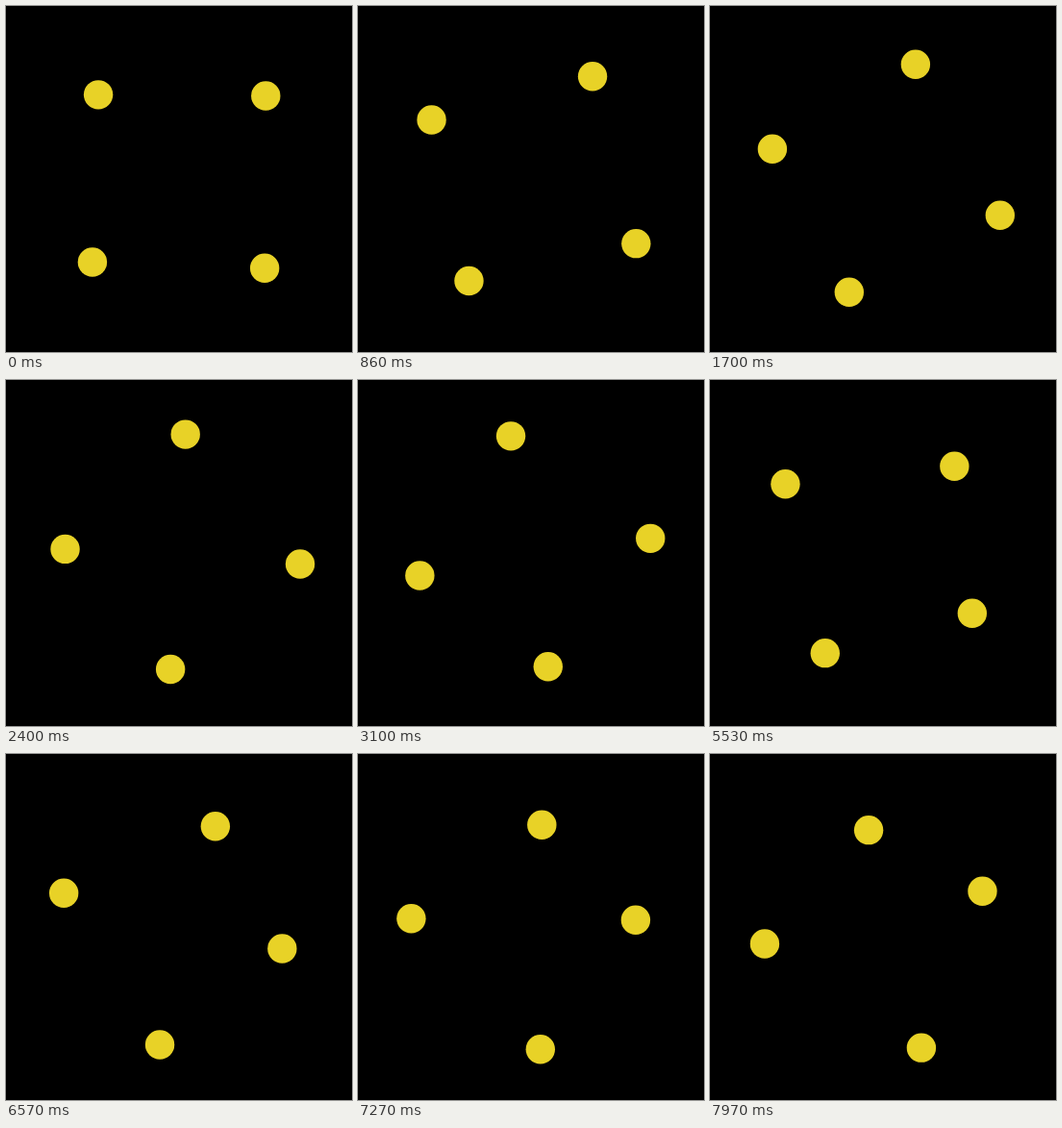
These frames come from a looping animation (360x360 px, 8000 ms). An HTML page:

```html
<!DOCTYPE html>
<html lang="en">
<head>
<meta charset="utf-8">
<title>Four orbiting bodies</title>
<style>
  html, body { margin: 0; height: 100%; overflow: hidden; background: #000; }
  svg { display: block; width: 100%; height: 100%; }
</style>
</head>
<body>
<svg viewBox="0 0 360 360" fill="#e8d227">
  <circle r="15.2"/><circle r="15.2"/><circle r="15.2"/><circle r="15.2"/>
</svg>
<script>
const LOOP = 8000;
const RAD = Math.PI / 180;
const CENTER = { x: 181.35, y: 181.25 };
const MEAN_RADIUS = 120.95;
const SWING = 4.45;            // radial amplitude of the slightly elliptic orbit
const SPEED = 18.63 * RAD;     // mean angular speed per second
const PHASE = 25 * RAD;
const START_ANGLE = 46.2 * RAD;

const dots = document.querySelectorAll('circle');

function place(dot, x, y) {
  dot.setAttribute('cx', CENTER.x + x);
  dot.setAttribute('cy', CENTER.y + y);
}

function draw(seconds) {
  const anomaly = PHASE + SPEED * seconds;
  const radius = MEAN_RADIUS + SWING * Math.cos(anomaly);
  const angle = START_ANGLE - SPEED * seconds
    + 2 * SWING / MEAN_RADIUS * (Math.sin(anomaly) - Math.sin(PHASE));
  const x = radius * Math.cos(angle);
  const y = radius * Math.sin(angle);

  // The two opposite pairs drift apart along the diagonal.
  const drift = 1.26 * Math.exp(0.2735 * seconds);
  place(dots[0], drift + x, drift + y);
  place(dots[1], drift - x, drift - y);
  place(dots[2], -drift + y, -drift - x);
  place(dots[3], -drift - y, -drift + x);
}

const start = performance.now();
function frame() {
  draw((performance.now() - start) % LOOP / 1000);
  requestAnimationFrame(frame);
}
frame();
</script>
</body>
</html>
```
